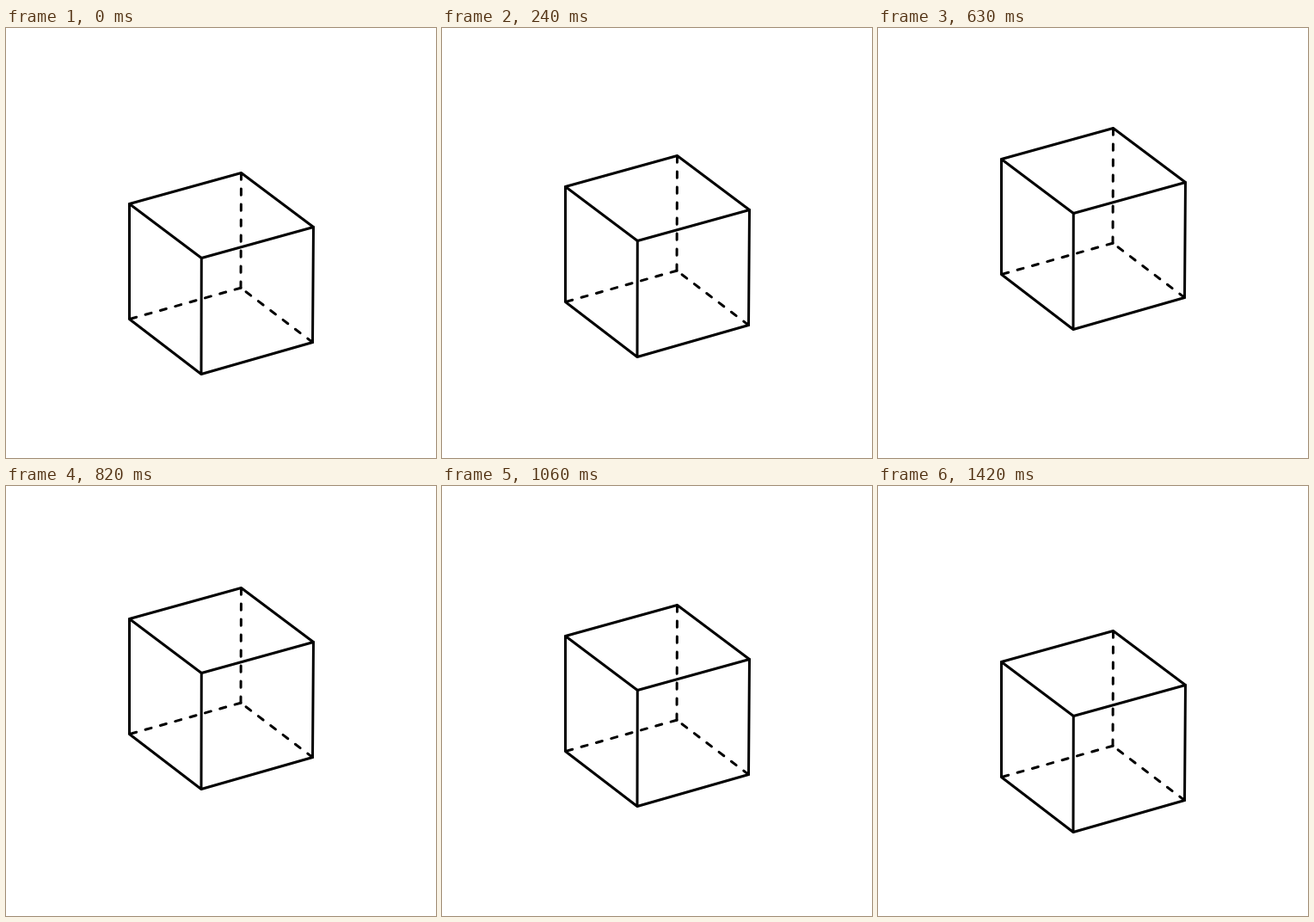
An HTML page for the animation above (1450 ms loop, 500 by 500 pixels).

```html
<!DOCTYPE html>
<html lang="en">
<head>
<meta charset="utf-8">
<title>Floating cube</title>
<style>
  html, body { margin: 0; width: 100%; height: 100%; overflow: hidden; background: #fff; }
  svg { display: block; width: 100vw; height: 100vh; }
  path { fill: none; stroke: #000; stroke-width: 3; stroke-linecap: round; stroke-linejoin: round; }
  .hidden { stroke-dasharray: 7.2 10.8; }
</style>
</head>
<body>
<svg viewBox="0 0 500 500">
  <g id="cube">
    <path d="M273.5 168.5L143.5 204.5L227.3 267.5L357.5 231.5Z"/>
    <path d="M143.5 204.5V338.5L227 402.5L356.5 365.5L357.5 231.5M227.3 267.5L227 402.5"/>
    <path class="hidden" d="M273 302.2L273.5 168.5"/>
    <path class="hidden" d="M273 302.2L143.5 338.5"/>
    <path class="hidden" d="M356.5 365.5L273 302.2"/>
  </g>
</svg>
<script>
  const LOOP = 1450, STEP = 30, PEAK = 60;
  const HOLD_START = 690, HOLD_END = 790, LAND = 1420;
  const RATE = PEAK / 23.5;
  const cube = document.getElementById('cube');

  // The cube moves on a two-pixel grid
  const snap = y => 2 * Math.floor(y / 2);

  function lift(t) {
    if (t >= HOLD_START && t < HOLD_END) return PEAK;
    const steps = t < HOLD_START
      ? Math.floor(t / STEP)
      : Math.max(0, Math.ceil((LAND - t) / STEP));
    return snap(steps * RATE);
  }

  const start = performance.now();
  function draw() {
    const t = (performance.now() - start) % LOOP;
    cube.setAttribute('transform', `translate(0 ${-lift(t)})`);
    requestAnimationFrame(draw);
  }
  draw();
</script>
</body>
</html>
```
